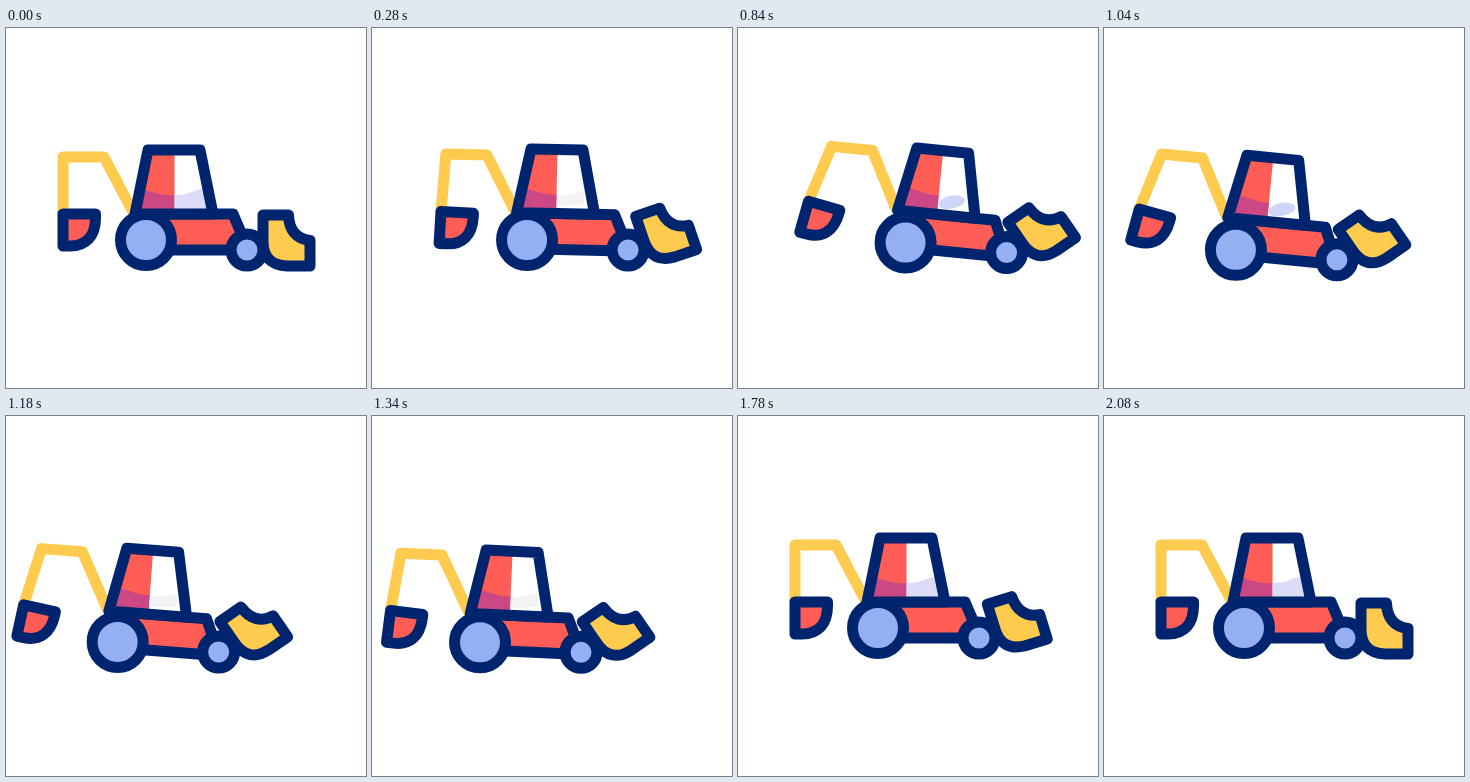
Animation, 360 px wide and 360 px high, one loop 3600 ms. Source, as an HTML page with a canvas:

```html
<!DOCTYPE html>
<html lang="en">
<head>
<meta charset="utf-8">
<title>Backhoe loader</title>
<style>
html, body { margin: 0; width: 100%; height: 100%; overflow: hidden; background: #fff; }
canvas { display: block; width: 360px; height: 360px; }
</style>
</head>
<body>
<canvas id="stage" width="360" height="360"></canvas>
<script>
const ctx = document.getElementById('stage').getContext('2d');
const LOOP = 3600;
const NAVY = '#00256e', RED = '#ff5d55', YELLOW = '#ffcb4f', BLUE = '#94aff2';
const PINK = '#cc4885', LILAC = '#dcdcf6', HAZE = '#f3f3f6', GLARE = '#cdd6f6';
const LINE = 11;

// Each track is a list of [time, value], eased in and out between keys.
const tracks = {
  x: [[0, 0], [673, 40.5], [1285, -33.5], [1695, 0]],
  y: [[0, 0], [673, 0], [1285, 15], [1695, 0]],
  lean: [[0, 0], [930, 5.9], [1695, 0]],
  scoop: [[0, 0], [530, -34.5], [1480, -34.5], [2080, 0]]
};

function at(keys, t) {
  for (let i = 1; i < keys.length; i++) {
    const [t0, a] = keys[i - 1], [t1, b] = keys[i];
    if (t < t1) return a + (b - a) * (1 - Math.cos(Math.PI * (t - t0) / (t1 - t0))) / 2;
  }
  return keys[keys.length - 1][1];
}

const rad = deg => deg * Math.PI / 180;

function turn(deg, x, y) {
  ctx.translate(x, y);
  ctx.rotate(rad(deg));
  ctx.translate(-x, -y);
}

function group(draw) {
  ctx.save();
  draw();
  ctx.restore();
}

function shape(d, fill, stroke) {
  const path = new Path2D(d);
  if (fill) {
    ctx.fillStyle = fill;
    ctx.fill(path);
  }
  if (stroke) {
    ctx.strokeStyle = stroke;
    ctx.stroke(path);
  }
}

function wheel(x, y, r) {
  ctx.beginPath();
  ctx.arc(x, y, r, 0, 2 * Math.PI);
  ctx.fillStyle = BLUE;
  ctx.fill();
  ctx.strokeStyle = NAVY;
  ctx.stroke();
}

function backArm(lean) {
  const bend = rad(2.95 * lean), reach = 57 + 0.45 * lean;
  const hx = 57 - reach * Math.sin(bend), hy = 129 + reach * Math.cos(bend);
  shape(`M${hx} ${hy}L57 129L98 129L127 184`, null, YELLOW);
  group(() => {
    ctx.translate(hx - 57, hy - 186);
    turn(1.75 * lean, 57, 186);
    shape('M57 186H89.5V190C89.5 208 80 218 64 218H57Z', RED, NAVY);
  });
}

function cab(lean) {
  const outline = 'M142 122H194L207 186H129Z';
  shape(outline, '#fff');
  group(() => {
    ctx.clip(new Path2D(outline));
    shape('M120 115H168.5V190H120Z', RED);
    shape('M120 160Q136 161 148 164.5T168.5 167V190H120Z', PINK);
    if (lean < 0.1) {
      shape('M168.5 167Q179 167 187 163.5T212 159V190H168.5Z', LILAC);
    } else if (lean < 4.5) {
      shape('M169 168Q179 168 187 165L196 164V176Q182 179 169 178Z', HAZE);
    } else {
      ctx.beginPath();
      ctx.ellipse(182, 172.5, 13.5, 6.5, rad(-16), 0, 2 * Math.PI);
      ctx.fillStyle = GLARE;
      ctx.fill();
    }
  });
  shape(outline, null, NAVY);
}

function draw(t) {
  const lean = at(tracks.lean, t);
  ctx.fillStyle = '#fff';
  ctx.fillRect(0, 0, 360, 360);
  ctx.lineWidth = LINE;
  ctx.lineJoin = ctx.lineCap = 'round';
  group(() => {
    ctx.translate(at(tracks.x, t), at(tracks.y, t));
    group(() => {
      turn(lean, 193, 212);
      backArm(lean);
      shape('M150 186H227L236 207V222H150Z', RED, NAVY);
      cab(lean);
    });
    group(() => {
      turn(at(tracks.scoop, t), 257, 213);
      shape('M257 187H282.5C283 202 290 211 304 212.5V238H281Q257 237 257 213Z', YELLOW, NAVY);
    });
    wheel(140, 212, 25.5);
    wheel(241, 222, 16);
  });
}

const start = performance.now();
function tick() {
  draw((performance.now() - start) % LOOP);
  requestAnimationFrame(tick);
}
tick();
</script>
</body>
</html>
```
